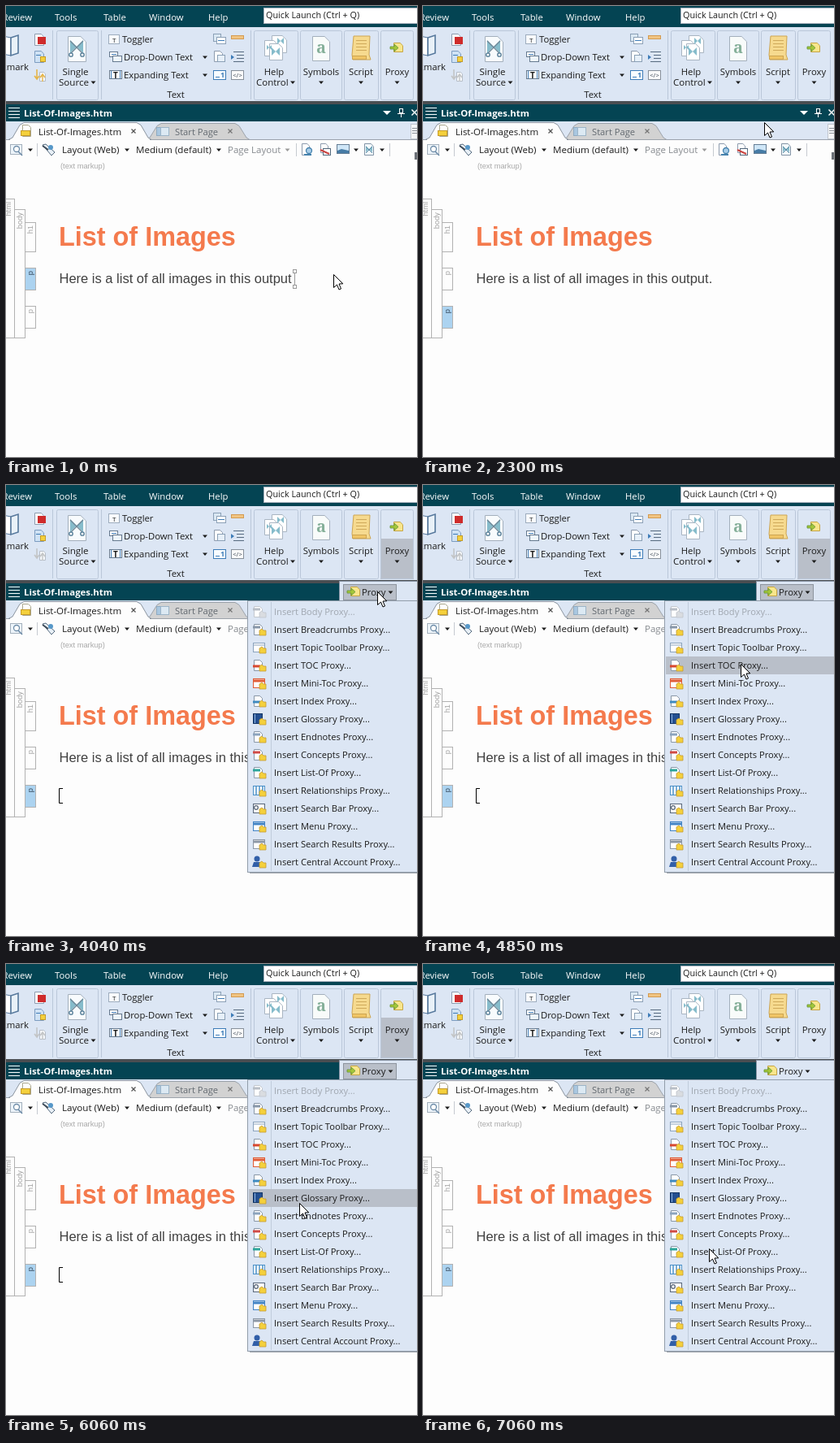
These frames come from a looping animation (506 px wide and 555 px high, 8000 ms). An HTML page with a canvas:

```html
<!DOCTYPE html>
<html lang="en">
<head>
<meta charset="utf-8">
<title>Inserting a proxy</title>
<style>
html, body { margin: 0; width: 100%; height: 100%; overflow: hidden; background: #fdfdfd; }
canvas { display: block; }
</style>
</head>
<body>
<canvas id="stage" width="506" height="555"></canvas>
<script>
const g = document.getElementById('stage').getContext('2d');
const LOOP = 8000;
const PANEL = '#dce6f4', INK = '#1c1c1c', TEAL = '#044453', HOVER = '#b9bfc9', EDGE = '#bac7d9';
const YELLOW = '#f4d03c', BLUE = '#3e7cb8', WING = '#86bccb';
const UI = '"Open Sans", "Noto Sans", sans-serif', ARIAL = '"Liberation Sans", Arial, sans-serif';

// Bursts of movement: start, end, number of steps
const bursts = [[150, 960, 7], [1270, 2300, 9], [2430, 2970, 5], [3360, 4170, 7],
  [4440, 5390, 8], [5540, 6480, 7], [6630, 6630, 1], [6910, 7060, 2]];
// Pointer: time, x, y
const path = [[1270, 403, 330], [2300, 420, 143], [2970, 481, 93], [3360, 481, 93],
  [3900, 457, 130], [4170, 457, 131], [4440, 450, 142], [4840, 391, 219],
  [5390, 374, 268], [6000, 361, 293], [6480, 354, 347], [6630, 352, 350]];
const blinks = [690, 1270, 1680, 2160, 2700, 3360, 3900, 4440, 4840, 5390, 5800, 6480];
const items = [['Body', '#b8bec6'], ['Breadcrumbs', '#8796a8'], ['Topic Toolbar', '#8ba3bd'],
  ['TOC', '#d8472f'], ['Mini-Toc', '#e05a34'], ['Index', '#3e8ac0'], ['Glossary', '#234f91'],
  ['Endnotes', '#8ba3bd'], ['Concepts', '#d04a45'], ['List-Of', '#2ba59a'],
  ['Relationships', '#4a90c8'], ['Search Bar', '#59677a'], ['Menu', '#3f82c4'],
  ['Search Results', '#8c97a5'], ['Central Account', '#315fa8']];

function rect(x, y, w, h, fill, edge) {
  if (fill) { g.fillStyle = fill; g.fillRect(x, y, w, h); }
  if (edge) { g.strokeStyle = edge; g.lineWidth = 1; g.strokeRect(x + .5, y + .5, w - 1, h - 1); }
}
function shape(points, fill, edge, width = 1, open) {
  g.beginPath();
  points.forEach(([x, y]) => g.lineTo(x, y));
  if (!open) g.closePath();
  if (fill) { g.fillStyle = fill; g.fill(); }
  if (edge) { g.strokeStyle = edge; g.lineWidth = width; g.stroke(); }
}
const line = (x1, y1, x2, y2, color, width = 1) => shape([[x1, y1], [x2, y2]], null, color, width, true);
function dot(x, y, r, fill, edge) {
  g.beginPath();
  g.arc(x, y, r, 0, 7);
  if (fill) { g.fillStyle = fill; g.fill(); }
  if (edge) { g.strokeStyle = edge; g.lineWidth = 1.3; g.stroke(); }
}
function text(s, x, y, color = INK, size = 11.3, align = 'left', family = UI, weight = 400) {
  g.font = `${weight} ${size}px ${family}`;
  g.textAlign = align;
  g.fillStyle = color;
  g.fillText(s, x, y);
}
const mid = (s, x, y, color, size) => text(s, x, y, color, size, 'center');
const drop = (x, y, color = INK) => shape([[x - 3, y - 1.5], [x + 3, y - 1.5], [x, y + 2]], color);
function cross(x, y, r, color, width = 1.2) {
  line(x - r, y - r, x + r, y + r, color, width);
  line(x - r, y + r, x + r, y - r, color, width);
}
function page(x, y, w, h, edge = '#8d9bae', fill = '#fff') {
  const c = w * .3;
  x += .5;
  y += .5;
  shape([[x, y], [x + w - c, y], [x + w, y + c], [x + w, y + h], [x, y + h]], fill, edge);
}
// Two triangles meeting in the middle
function wings(x, y, r) {
  shape([[x - r, y - r], [x, y], [x - r, y + r]], WING);
  shape([[x + r, y - r], [x, y], [x + r, y + r]], WING);
}
function button(x, w) {
  g.beginPath();
  g.roundRect(x + .5, 30.5, w - 1, 85, 2);
  g.strokeStyle = EDGE;
  g.lineWidth = 1;
  g.stroke();
}
function proxyIcon(x, y) {
  page(x + 4, y, 11, 11, '#c6a544', '#f8e68c');
  shape([[x, y + 5], [x + 5, y + 5], [x + 5, y + 2], [x + 10, y + 6.5], [x + 5, y + 11], [x + 5, y + 8], [x, y + 8]],
    '#a4c639', '#5f9436', .8);
}

function ribbon(t) {
  rect(0, 0, 506, 26, TEAL);
  rect(0, 26, 506, 91, PANEL);
  text('Review', 32, 18, '#fff', 11.3, 'right');
  [['Tools', 60], ['Table', 120], ['Window', 176], ['Help', 249]].forEach(([s, x]) => text(s, x, 18, '#fff'));
  rect(317, 2, 192, 20, '#fff', '#a7b0bc');
  text('Quick Launch (Ctrl + Q)', 320, 15, INK, 10.8);

  // left group
  shape([[-4, 37], [6, 39], [6, 61], [-4, 59]], '#fff', '#56789c');
  shape([[6, 39], [15, 36], [15, 58], [6, 61]], '#e9f1f8', '#56789c', 1.6);
  text('Bookmark', 28, 79, INK, 11.3, 'right');
  page(35, 34, 11, 14);
  rect(39, 38, 10, 9, '#cf2b2b');
  page(35, 55, 11, 14, '#7c9cc0', '#cfe2f4');
  line(37, 60.5, 43, 60.5, BLUE);
  rect(42, 62, 7, 7, YELLOW, '#c59c28');
  const arrow = t < 1270 ? '#e5b54a' : '#c3c5c6';
  shape([[38, 78], [38, 89], [35, 86], [38, 90], [41, 86]], null, arrow, 1.6, true);
  page(41, 81, 7, 11, '#b6bec8', '#f5f7fa');
  shape([[45, 93], [45, 85], [42, 88], [45, 84], [48, 88]], null, arrow, 1.4, true);
  [57, 117, 301].forEach(x => line(x + .5, 30, x + .5, 115, EDGE));

  // single source
  button(62, 52);
  page(76, 37, 22, 31, '#a3afbc', '#f8fbfd');
  wings(87, 50, 8);
  cross(87, 51, 8, '#6f8796', 1.2);
  dot(80, 60, 2.2, '#fff', '#4e7893');
  dot(94, 60, 2.2, '#fff', '#4e7893');
  mid('Single', 85.5, 85, INK, 11.6);
  text('Source', 65, 98, INK, 11.6);
  drop(107.5, 94);

  // text group
  rect(126, 35, 14, 12, '#f8fafd', '#9dacbd');
  text('T', 131, 45, INK, 8);
  rect(127, 56, 11, 7, '#fff', '#65798e');
  line(130, 59.5, 136, 59.5, BLUE);
  rect(131, 61, 12, 8, '#eef5fb', '#65798e');
  rect(127, 79, 16, 11, '#fff', '#65798e');
  text('T', 132, 89, INK, 10, 'left', UI, 700);
  line(129.5, 80, 129.5, 89, BLUE);
  line(140.5, 80, 140.5, 89, BLUE);
  text('Toggler', 143, 45);
  text('Drop-Down Text', 145, 67);
  text('Expanding Text', 145, 89);
  drop(245, 63);
  drop(245, 85);
  mid('Text', 209, 113);
  rect(255, 34, 10, 10, '#dbe8f3', '#8ba0b6');
  rect(259, 38, 12, 9, '#fff', '#8ba0b6');
  line(261, 42.5, 269, 42.5, BLUE);
  rect(277, 36, 16, 5, '#f0c482', '#d39b52');
  page(256, 55, 10, 13);
  rect(260, 60, 10, 9, '#e7f0f9', '#8ba0b6');
  shape([[277, 60], [281, 63], [277, 66]], BLUE);
  [56, 60, 64, 68].forEach((y, i) => line(i % 3 ? 284 : 280, y + .5, 293, y + .5, '#566a7f'));
  rect(255, 79, 16, 12, '#f8fcff', BLUE);
  text('1', 264, 88, BLUE, 9, 'left', UI, 700);
  line(258, 87.5, 263, 87.5, BLUE);
  rect(277, 79, 16, 12, '#fafafa', '#87909b');
  mid('</>', 285, 88, '#384553', 7.5);

  // large buttons
  button(305, 55);
  page(327, 36, 18, 21, '#a9b5c2');
  page(318, 42, 16, 19, '#a9b5c2');
  page(324, 46, 16, 20, '#a9b5c2');
  wings(338, 43, 4);
  wings(324, 51, 3);
  wings(332, 56, 5);
  mid('Help', 330, 85);
  text('Control', 308, 98, INK, 11.5);
  drop(353, 94);

  button(362, 52);
  page(377, 37, 21, 30, '#a3afbc', '#f8fbfa');
  text('a', 388, 58, '#86b09a', 20, 'center', '"Noto Serif", serif', 700);
  mid('Symbols', 388, 85);
  drop(388, 94);

  button(416, 43);
  shape([[428, 37], [448, 37], [447, 60], [449, 66], [427, 66], [426, 60]], '#f6da8f', '#cda552');
  rect(426, 61, 18, 5, '#f0c566', '#cda552');
  [42, 46, 50, 54].forEach(y => line(431, y + .5, 444, y + .5, '#cfa95a'));
  mid('Script', 437, 85);
  drop(437, 94);

  if (t >= 2700 && t < 6910) rect(461, 66, 41, 50, HOVER);
  button(461, 41);
  proxyIcon(473, 45);
  mid('Proxy', 481.5, 85);
  drop(481.5, 94);
}

function tab(x, w, top, fill, edge) {
  shape([[x, 164.5], [x + 5, 162], [x + 14, top + 3], [x + 19, top], [x + w - 18, top],
    [x + w - 13, top + 3], [x + w - 4, 162], [x + w, 164.5]], fill, edge);
}

function documentBars() {
  rect(0, 117, 506, 4, '#4a4e52');
  rect(0, 121, 506, 21, TEAL);
  [126, 130, 134, 138].forEach(y => line(3, y - .5, 17, y - .5, '#fff'));
  text('List-Of-Images.htm', 22, 136, '#fff', 11.4, 'left', UI, 700);
  shape([[464, 129], [474, 129], [469, 134]], '#fff');
  rect(484, 126, 5, 6, null, '#fff');
  line(482, 132.5, 491, 132.5, '#fff');
  line(486.5, 133, 486.5, 137, '#fff');
  cross(503, 131, 3.5, '#fff', 1.5);

  rect(0, 142, 506, 22, PANEL);
  rect(0, 164, 506, 25, '#fdfdfd');
  line(0, 164.5, 506, 164.5, '#9aa2ad');
  tab(172, 128, 144.5, '#d2d2d2', '#9da3ab');
  tab(3, 176, 143.5, '#fdfdfd', '#8b949f');
  line(5, 164.5, 177, 164.5, '#fdfdfd');
  page(20, 146, 10, 14, '#a9a68e');
  rect(18, 153, 12, 7, YELLOW, '#c69b29');
  text('List-Of-Images.htm', 40, 159, INK, 11.5);
  cross(157, 154, 2.5, '#555');
  rect(185, 149, 11, 11, '#a9c7e0', '#8fabc2');
  rect(190, 149, 11, 11, '#dce9f3', '#9db5c8');
  text('Start Page', 208, 159, '#626970', 11.2);
  cross(276, 154, 2.5, '#777');
  rect(498, 145, 10, 19, '#f4f6f8', '#c1c7cf');
  [150, 153, 156].forEach(y => line(500, y + .5, 506, y + .5, '#8d939a'));

  rect(5, 170, 15, 13, '#edf4fa', '#a3b0bc');
  dot(13, 176, 3.5, '#fff', '#6d8ca8');
  line(15, 179, 20, 184, '#6d8ca8', 1.6);
  drop(30, 177);
  [38, 357, 472].forEach(x => line(x + .5, 169, x + .5, 185, '#c6cad0'));
  shape([[45, 171], [49, 170], [60, 180], [56, 184]], '#e8f0f7', '#53687c');
  line(45, 172, 52, 177, '#3f4c59', 2);
  dot(55, 174, 3, '#5798c9');
  text('Layout (Web)', 69, 181, INK, 11.6);
  drop(149, 177);
  text('Medium (default)', 160, 181, INK, 11.6);
  drop(262, 177);
  text('Page Layout', 273, 181, '#85898e', 11.5);
  drop(346.5, 177, '#999');
  page(364, 169, 9, 14);
  dot(373, 178, 3.5, '#a8cde8', '#4682ad');
  line(367, 183, 376, 183, '#4682ad', 2);
  page(387, 169, 9, 11);
  rect(390, 175, 10, 9, '#fff', '#53687c');
  line(387, 177, 398, 182, '#c94340', 2);
  rect(407, 170, 16, 12, '#cfe6f7', '#647d94');
  shape([[408, 181], [408, 178], [413, 176], [422, 178], [422, 181]], '#477ca6');
  drop(431, 177);
  page(441, 169, 11, 14, '#8193a5', '#f4f9fc');
  wings(447, 176, 4);
  cross(447, 177, 4, '#5d8aa5', 1);
  drop(463, 177);
  rect(503, 180, 3, 9, '#6c7178');
}

function tag(label, x, y, w, h, end, on) {
  rect(x, y, w, h, on ? '#acd3f0' : '#fdfdfd', '#b2b2b2');
  g.save();
  g.translate(x + w / 2 + 2.5, end);
  g.rotate(-Math.PI / 2);
  text(label, 0, 0, on ? '#33475a' : '#a3a3a3', 9.3, 'right', ARIAL);
  g.restore();
}

function content(t) {
  rect(0, 189, 506, 366, '#fdfdfd');
  text('(text markup)', 67, 200, '#a8a8a8', 9.3, 'left', ARIAL);
  tag('html', -4, 237, 15, 172, 241);
  tag('body', 10, 250, 14, 159, 254);
  tag('h1', 23, 266, 14, 37, 270);
  tag('p', 23, 322, 14, 28, 326, t < 1270);
  tag('p', 23, 369, 14, 28, 373, t >= 1270);
  text('List of Images', 65, 295, '#f47a4d', 32.4, 'left', ARIAL, 700);
  text('Here is a list of all images in this output' + (t < 420 ? '' : '.'), 65.5, 341, '#404040', 16.5, 'left', ARIAL);
  if (t < 690) {
    line(355.5, 327, 355.5, 345, '#999');
    rect(353, 324, 5, 5, '#fff', '#999');
    rect(353, 343, 5, 5, '#fff', '#999');
  } else if (blinks.filter(b => b <= t).length % 2) {
    shape([[70, 373.5], [65.5, 373.5], [65.5, 391.5], [70, 391.5]], null, '#000', 1, true);
  }
}

function popup(t) {
  rect(412, 207, 94, 2, '#a4a9b0');
  rect(410, 118, 100, 89, PANEL, '#8995a5');
  if (t >= 3765 && t < 6910) rect(415, 122, 66, 20, HOVER, '#8d949e');
  proxyIcon(420, 125);
  text('Proxy', 438, 136);
  drop(473.5, 132);
  [['Page Header', 158, 148], ['Page Footer', 180, 179]].forEach(([s, y, bar]) => {
    page(422, y - 12, 10, 14);
    line(421, bar + .5, 429, bar + .5, '#7f9ab5', 2);
    text(s, 436, y, INK, 11.2);
  });
  mid('Proxy', 461.5, 203, '#969da7');
}

function itemIcon(i, color, y) {
  if (i === 14) {
    dot(309, y - 4, 3.5, color);
    shape([[303, y + 6], [305, y], [313, y], [315, y + 6]], color);
  } else if (i === 6) {
    rect(304, y - 7, 12, 13, color, '#153766');
    line(306.5, y - 6, 306.5, y + 5, '#91b5df');
  } else if ([2, 4, 10, 11, 12, 13].includes(i)) {
    rect(304, y - 6, 15, 12, '#fff', color);
    if (i === 10) [308, 312, 316].forEach(x => line(x, y - 6, x, y + 5, color, 1.5));
    else if (i === 11) dot(308, y - 1, 2.3, '#fff', color);
    else line(305, y - 3, 318, y - 3, color, i === 2 ? 1 : 3);
  } else {
    const bar = y + (i === 3 || i === 5 ? 1 : -3);
    page(305, y - 7, 10, 13, i ? '#8997a7' : '#c2c7ce');
    line(304, bar, 313, bar, color, 3);
  }
  shape([[312, y + 1], [315, y - 1], [317, y + 1], [320, y + 1], [320, y + 7], [312, y + 7]],
    i ? YELLOW : '#d9dce0', i ? '#c49b31' : '#c0c5cc', .8);
}

function submenu(t, p) {
  rect(300, 476, 206, 2, '#9aa0a8');
  rect(297, 142, 213, 335, PANEL, '#929daa');
  line(326.5, 144, 326.5, 475, '#c0ccdc');
  const row = t < 6910 ? Math.floor((p[1] - 145) / 22) : -1;
  items.forEach(([name, color], i) => {
    const y = 156 + 22 * i;
    if (i === row && i) rect(299, y - 11, 207, 22, HOVER);
    itemIcon(i, color, y);
    text(`Insert ${name} Proxy...`, 330, y + 4, i ? INK : '#a0a7b0', 11.15);
  });
}

function pointer(t) {
  let i = 0;
  while (i < path.length - 2 && t >= path[i + 1][0]) i++;
  const [a, b] = [path[i], path[i + 1]];
  const k = Math.min(1, Math.max(0, (t - a[0]) / (b[0] - a[0])));
  return [1, 2].map(j => Math.round(a[j] + (b[j] - a[j]) * k));
}

function snap(t) {
  const burst = bursts.filter(b => b[0] <= t).pop();
  if (!burst) return 0;
  const [from, to, n] = burst;
  if (t >= to) return to;
  const step = (to - from) / (n - 1);
  return from + Math.floor((t - from) / step + 1e-6) * step;
}

function draw(time) {
  const t = snap(time), p = pointer(t);
  content(t);
  documentBars();
  ribbon(t);
  if (t >= 3360) popup(t);
  if (t >= 3900) submenu(t, p);
  if (t < 150 || t >= 1270) {
    const arrow = [[0, 0], [0, 16], [4, 12.5], [6.5, 18.5], [9, 17.5], [6.5, 11.5], [11.3, 11.3]];
    shape(arrow.map(([x, y]) => [p[0] + x + .5, p[1] + y + .5]), '#fff', '#000');
  }
}

const start = performance.now();
function tick() {
  draw((performance.now() - start) % LOOP);
  requestAnimationFrame(tick);
}
tick();
</script>
</body>
</html>
```
